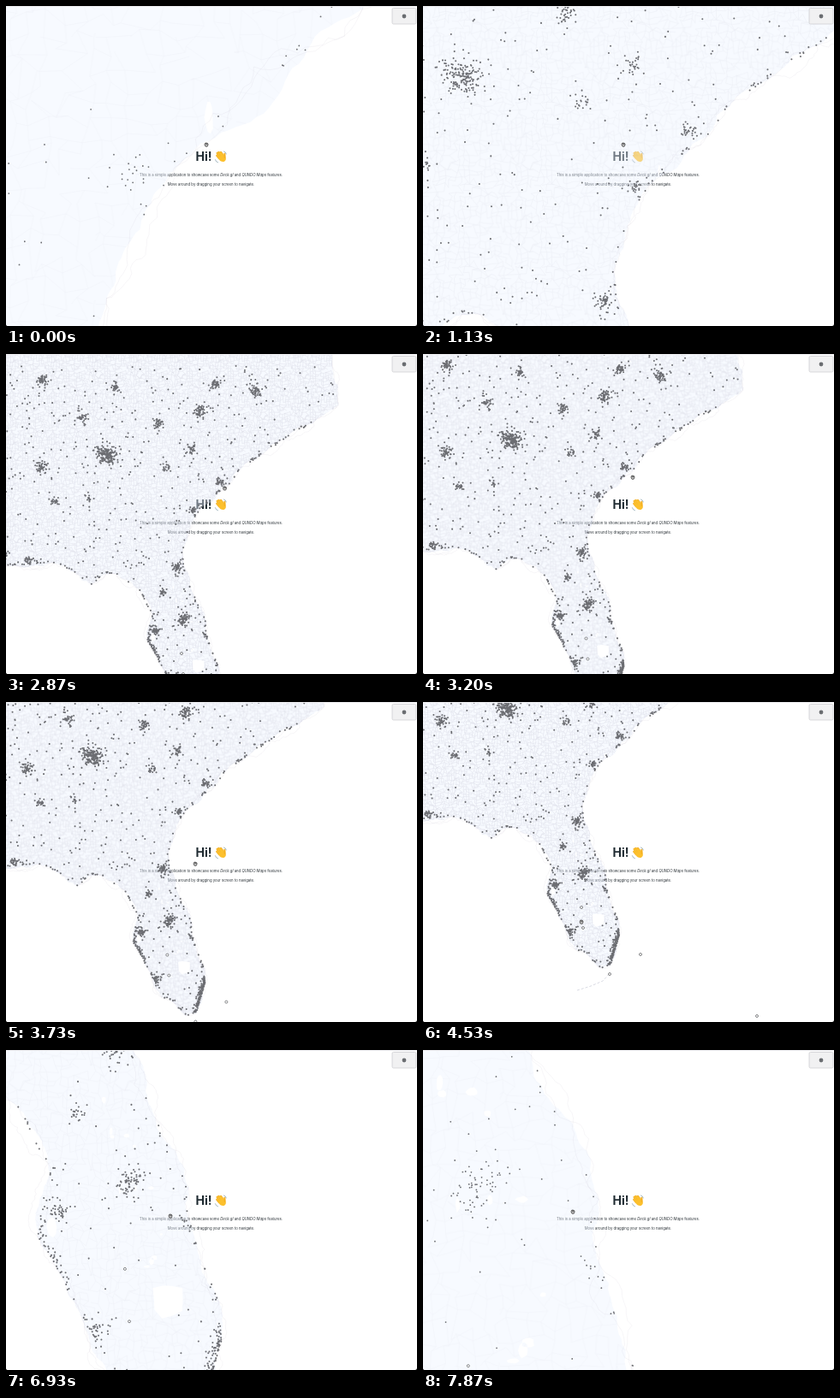
These frames come from a looping animation (480x374 px, 8 s). An HTML page:

```html
<!DOCTYPE html>
<html lang="en">
<head>
<meta charset="utf-8">
<title>Map</title>
<style>
  html, body { margin: 0; width: 100%; height: 100%; overflow: hidden; background: #fff; }
  svg { display: block; width: 100vw; height: 100vh; }
  .title { font: 700 14px Inter, "Liberation Sans", sans-serif; fill: #1f2a31; }
  .line { font: 4.27px Inter, "Liberation Sans", sans-serif; fill: #2c3338; text-anchor: middle; }
  .fixed { vector-effect: non-scaling-stroke; fill: none; }
</style>
</head>
<body>
<svg viewBox="0 0 480 374">
  <defs>
    <pattern id="mesh" width="48" height="48" patternUnits="userSpaceOnUse">
      <path id="meshLines" fill="none" stroke="#8c89a0" />
    </pattern>
  </defs>
  <rect width="480" height="374" fill="#fff" />

  <text class="title" x="221.5" y="181.3">Hi!</text>
  <g transform="translate(251 176.5)" stroke-linecap="round" fill="none">
    <g transform="rotate(-38)">
      <path d="M-2.6 0V-4.2M-.6 -1V-6.2M1.4 -1V-6M3.2 0V-4.4" stroke="#e59a18" stroke-width="2.3" />
      <path d="M-2.6 0V-4.2M-.6 -1V-6.2M1.4 -1V-6M3.2 0V-4.4" stroke="#fcc02e" stroke-width="1.8" />
      <path d="M-3.5 -1.2H4.2V2.5Q4 6.5 .4 6.5Q-2 6.5 -3.5 3Z" fill="#fcc02e" />
      <path d="M3.4 3.2L5.7 -.2" stroke="#f5b021" stroke-width="2" />
    </g>
    <path d="M3.5 -6.6Q5.8 -5.9 6.3 -3.6M-6.6 3.2Q-6 5.8 -3.5 6.4" stroke="#7f9aa8" stroke-width=".7" />
  </g>
  <text class="line" x="239.5" y="198.5">This is a simple application to showcase some <tspan font-style="italic">Deck.gl</tspan> and <tspan font-style="italic">QUNDO Maps</tspan> features.</text>
  <text class="line" x="239.5" y="209.5">Move around by dragging your screen to navigate.</text>

  <g id="world">
    <path id="land" fill="rgb(236,243,254)" fill-opacity=".4" fill-rule="evenodd" />
    <path id="grain" fill="url(#mesh)" fill-rule="evenodd" />
    <path id="marsh" class="fixed" stroke="#968ea5" stroke-opacity=".16" stroke-width=".5" />
    <path class="fixed" d="M180 337L196 332L210 326L219 316" stroke="#c9cbd8" stroke-opacity=".7" stroke-dasharray="3 2" />
    <path id="gap" d="M-95 -8H8.3V135H-95ZM357 -96h30v90h-30ZM-95 -165H400V-96H-95Z" fill="#fff" />
    <path id="dots" class="fixed" stroke="#5b5c60" stroke-opacity=".88" stroke-linecap="round" />
  </g>
  <g id="rings" fill="#fff" stroke="#55565a" stroke-width=".7"></g>

  <g id="cursor" stroke="#222" stroke-width=".6" stroke-linejoin="round">
    <path d="M-2 -.3L-1.4 -1.7L-.5 -2L.4 -1.8L1.3 -1.6L2 -.9L1.9 .8L1.2 2.2H-1L-1.8 .9Z" fill="#bbb" />
    <path d="M-.7 -1.6V-.3M.3 -1.6V-.3M1.2 -1.3V-.2" />
  </g>

  <path d="M0 .5H480" stroke="#e9e9ec" />
  <rect x="451" y="2.5" width="28" height="18.5" rx="1.5" fill="#f1f1f2" stroke="#cfcfd2" stroke-width=".8" />
  <circle cx="465" cy="12" r="2.4" fill="#6a6d71" />
  <path d="M0 372.6V374H1.4ZM480 372.2V374H478.2Z" fill="#333" />
</svg>

<script>
const LOOP = 8000;
const $ = id => document.getElementById(id);
const mix = (a, b, u) => a + (b - a) * u;

function seeded(a) {
  return () => {
    a = (a + 0x6d2b79f5) | 0;
    let t = Math.imul(a ^ (a >>> 15), 1 | a);
    t = (t + Math.imul(t ^ (t >>> 7), 61 | t)) ^ t;
    return ((t ^ (t >>> 14)) >>> 0) / 4294967296;
  };
}
const rand = seeded(41);
const gauss = () => Math.sqrt(-2 * Math.log(1 - rand())) * Math.cos(2 * Math.PI * rand());
const bump = (v, mid, width) => Math.exp(-(((v - mid) / width) ** 2));

const closed = pts => "M" + pts.map(p => p[0].toFixed(2) + " " + p[1].toFixed(2)).join("L") + "Z";

// Key points of the coast, clockwise from the north-west corner
const coast = [
  [-90, -160], [361, -160], [361, -96], [368, -50], [340, -31], [306, -11], [278, 8], [256, 22],
  [240, 43], [207, 71], [194, 95], [186, 122], [188, 138], [199, 171], [214, 203], [214, 217],
  [228, 255], [229, 273], [219, 308], [207, 311], [189, 293], [178, 289], [166, 264], [154, 240],
  [145, 225], [150, 192], [132, 163], [108, 147], [97, 147], [80, 160], [60, 145], [35, 134],
  [-10, 137], [-90, 135]
];

// Big lake, two bays, then small lakes down the peninsula: x, y, rx, ry
const lakes = [[204.5, 254, 7.5, 8], [151.5, 221, 2.4, 5], [212.4, 62.5, .8, 3]];
for (let i = 0; i < 12; i++) {
  const y = mix(160, 250, rand());
  lakes.push([y / 4 + 142 + gauss() * 5, y, .5 + rand(), .5 + rand() * 1.5]);
}

// Midpoint displacement; the northern border stays straight
function rough(pts, amount) {
  for (let pass = 0; pass < 5; pass++) {
    pts = pts.flatMap((p, i) => {
      const q = pts[(i + 1) % pts.length];
      const dx = q[0] - p[0], dy = q[1] - p[1];
      const d = p[1] < -90 && q[1] < -90 ? 0 : (rand() - .5) * amount;
      return [p, [(p[0] + q[0]) / 2 - dy * d, (p[1] + q[1]) / 2 + dx * d]];
    });
  }
  return pts;
}

function lakeShape([x, y, rx, ry]) {
  return closed(Array.from({ length: 10 }, (_, i) => {
    const a = i * Math.PI / 5, r = .8 + rand() * .35;
    return [x + Math.cos(a) * rx * r, y + Math.sin(a) * ry * r];
  }));
}

const landPath = closed(rough(coast, .22)) + lakes.map(lakeShape).join("");
$("land").setAttribute("d", landPath);
$("grain").setAttribute("d", landPath);
$("marsh").setAttribute("d", closed(rough(coast, .3)) + closed(rough(coast, .4)));

// Block mesh: one seamless tile with some edges left out
{
  const n = 16, cell = 3;
  const jitter = Array.from({ length: n * n }, () => [gauss(), gauss()]);
  const node = (i, j) => {
    const [a, b] = jitter[((i + n) % n) * n + (j + n) % n];
    return (i * cell + a).toFixed(2) + " " + (j * cell + b).toFixed(2);
  };
  let d = "";
  for (let i = -1; i <= n; i++) {
    for (let j = -1; j <= n; j++) {
      if (rand() < .8) d += `M${node(i, j)}L${node(i + 1, j)}`;
      if (rand() < .8) d += `M${node(i, j)}L${node(i, j + 1)}`;
    }
  }
  $("meshLines").setAttribute("d", d);
}

function isLand(x, y) {
  let inside = false;
  coast.forEach(([ax, ay], i) => {
    const [bx, by] = coast[(i + 1) % coast.length];
    if ((ay > y) !== (by > y) && x < (bx - ax) * (y - ay) / (by - ay) + ax) inside = !inside;
  });
  return inside && !lakes.some(([lx, ly, rx, ry]) => Math.hypot((x - lx) / rx, (y - ly) / ry) < 1);
}

// Main towns: x, y, number of dots
const towns = [
  [97, 8, 170], [23, -79, 50], [107, -71, 28], [225, -74, 40], [271, -67, 55], [206, -43, 60],
  [157, -29, 35], [69, -36, 30], [197, 2, 30], [21, 22, 45], [37, 63, 18], [77, 59, 14],
  [167, 23, 20], [230, 40, 28], [199, 73, 22], [181, 138, 55], [6, 131, 25], [-22, 124, 22],
  [164, 168, 24], [188, 200, 75], [155, 214, 45], [172, 267, 35]
];

let dotPath = "";
function scatter(x, y) {
  if (y > -96 && isLand(x, y)) dotPath += `M${x.toFixed(2)} ${y.toFixed(2)}h0`;
}
for (let i = 0; i < 980; i++) scatter(mix(-70, 370, rand()), mix(-96, 310, rand()));
for (const [x, y, n] of towns) {
  for (let i = 0; i < n; i++) {
    const s = (Math.sqrt(n) * .42 + .6) * (.5 + rand());
    scatter(x + gauss() * s, y + gauss() * s);
  }
}

// Settled shores, crowded in the south-east and around the western bay
const crowd = (x, y) => .35 + (x > 215 ? 7 * bump(y, 286, 22) : 2.6 * bump(y, 228, 16));
coast.forEach(([ax, ay], i) => {
  const [bx, by] = coast[(i + 1) % coast.length];
  if (ay < -35) return;
  for (let n = Math.hypot(bx - ax, by - ay) * 8; n > 0; n--) {
    const u = rand(), x = mix(ax, bx, u), y = mix(ay, by, u);
    if (rand() * 8 < crowd(x, y)) scatter(x + gauss() * 1.9, y + gauss() * 1.9);
  }
});
$("dots").setAttribute("d", dotPath);

const rings = [[185, 240], [187, 264], [254, 295], [218, 318], [390, 367]].map(pos => {
  const el = document.createElementNS("http://www.w3.org/2000/svg", "circle");
  el.setAttribute("r", 1.5);
  $("rings").append(el);
  return { el, pos };
});

// Camera: time, scale, x, y
const views = [
  [70, 6.5, -1143.5, -276], [1670, 1.1, 50, 135], [2000, 1.06, 61.2, 143.5], [2870, 1, 20, 110],
  [3200, 1, 5.5, 92.5], [4530, 1, 0, 0], [4670, 1, 0, 0], [5730, 2, -194, -245],
  [5870, 2, -194, -245], [6930, 2.554, -333.5, -357.2], [7530, 5.26, -920.3, -893.2]
];
// Pointer: time, x, y
const hand = [
  [1670, 234, 162], [2000, 283, 191], [3200, 245, 144], [4530, 185, 257],
  [5730, 206, 230], [7530, 185, 176], [7730, 185, 176], [7870, 175, 189]
];

// Neighbouring keys and the share of the way between them
function span(keys, t) {
  let i = 0;
  while (i < keys.length - 2 && t >= keys[i + 1][0]) i++;
  const a = keys[i], b = keys[i + 1];
  return [a, b, Math.min(1, Math.max(0, (t - a[0]) / (b[0] - a[0])))];
}

function camera(t) {
  const [a, b, u] = span(views, t);
  const k = a[1] * Math.pow(b[1] / a[1], u);
  // Shifting in step with the scale keeps one point of the screen still
  const v = a[1] === b[1] ? u : (k - a[1]) / (b[1] - a[1]);
  return [k, mix(a[2], b[2], v), mix(a[3], b[3], v)];
}

function draw(t) {
  const [k, x, y] = camera(t);
  $("world").setAttribute("transform", `matrix(${k} 0 0 ${k} ${x} ${y})`);
  $("meshLines").setAttribute("stroke-width", .5 / k);
  $("grain").setAttribute("opacity", Math.max(.08, .25 / k));
  $("dots").setAttribute("stroke-width", k > 4 ? 1.8 : 2.05);
  $("gap").setAttribute("visibility", t > 1000 && t < 2300 ? "visible" : "hidden");
  for (const { el, pos } of rings) {
    el.setAttribute("cx", pos[0] * k + x);
    el.setAttribute("cy", pos[1] * k + y);
  }
  const [a, b, u] = span(hand, t);
  $("cursor").setAttribute("transform", `translate(${mix(a[1], b[1], u)} ${mix(a[2], b[2], u)})`);
}

const start = performance.now();
function tick() {
  draw((performance.now() - start) % LOOP);
  requestAnimationFrame(tick);
}
tick();
</script>
</body>
</html>
```
